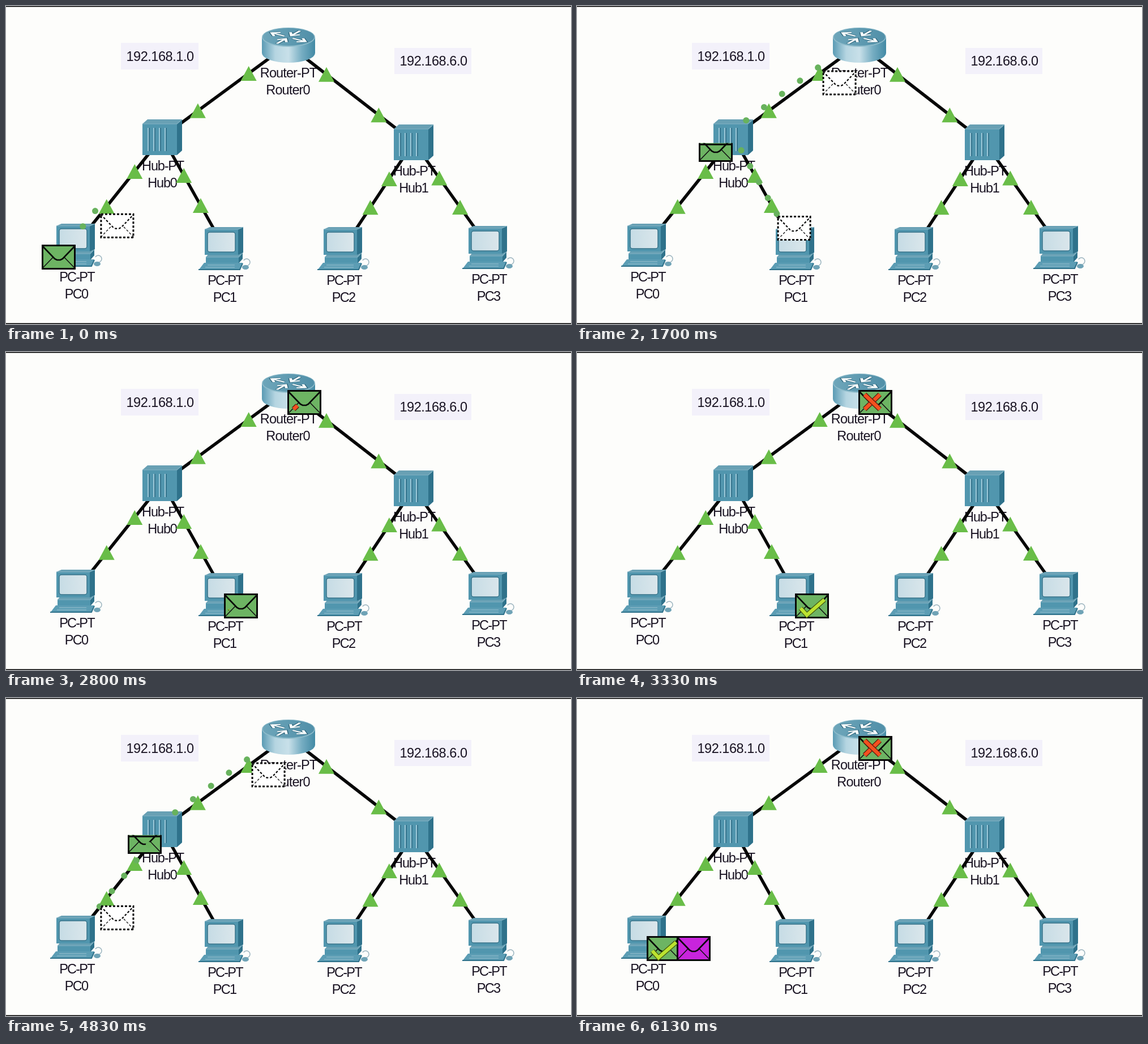
An HTML page with a canvas for the animation above (6.16 s loop, 998 by 561 pixels).

```html
<!DOCTYPE html>
<html lang="en">
<head>
<meta charset="utf-8">
<title>Network packet simulation</title>
<style>
html, body { margin: 0; width: 100%; height: 100%; overflow: hidden; background: #fdfdfb; }
canvas { display: block; }
</style>
</head>
<body>
<canvas id="stage" width="998" height="561"></canvas>
<script>
const ctx = document.getElementById('stage').getContext('2d');
const LOOP = 6160, STEPS = 7, STEP_MS = 101, MARK_MS = 520;

const router = [498, 68], hubs = [[276, 231], [720, 240]];
const pcs = [[124, 421], [386, 427], [596, 427], [852, 425]];
const links = [...hubs.map(h => [h, router]), ...pcs.map((p, i) => [hubs[i >> 1], p])];

// Each hop: start time, sender, receivers, and when the verdict is drawn.
const hops = [
  { start: -205, from: pcs[0], to: [hubs[0]] },
  { start: 1195, from: hubs[0], to: [router, pcs[1]], mark: 2770 },
  { start: 3350, from: pcs[1], to: [hubs[0]] },
  { start: 4300, from: hubs[0], to: [router, pcs[0]], mark: 5007, reply: true }
];

const clamp = v => Math.max(0, Math.min(1, v));
const mix = ([x0, y0], [x1, y1], f) => [x0 + (x1 - x0) * f, y0 + (y1 - y0) * f];
const gap = ([x0, y0], [x1, y1]) => Math.hypot(x1 - x0, y1 - y0);

function rect(x, y, w, h, color) {
  ctx.fillStyle = color;
  ctx.fillRect(x, y, w, h);
}

function trace(points) {
  ctx.beginPath();
  points.forEach(p => ctx.lineTo(...p));
}

function poly(points, color) {
  trace(points);
  ctx.fillStyle = color;
  ctx.fill();
}

function line(points, color, width) {
  trace(points);
  ctx.strokeStyle = color;
  ctx.lineWidth = width;
  ctx.stroke();
}

function outlined(points, width, dark, light) {
  line(points, dark, width + 2.5);
  line(points, light, width);
}

function ellipse(x, y, rx, ry, color) {
  ctx.beginPath();
  ctx.ellipse(x, y, rx, ry, 0, 0, 7);
  ctx.fillStyle = color;
  ctx.fill();
}

function shade(x0, x1, ...colors) {
  const g = ctx.createLinearGradient(x0, 0, x1, 0);
  colors.forEach((c, i) => g.addColorStop(i / (colors.length - 1), c));
  return g;
}

function at([x, y], draw) {
  ctx.save();
  ctx.translate(x, y);
  draw();
  ctx.restore();
}

// A block seen from the front left: front face, lid and right side.
function block(x, y, w, h, dx, dy) {
  const r = x + w, b = y + h;
  poly([[x, y], [x + dx, y - dy], [r + dx, y - dy], [r, y]], '#68a0b4');
  poly([[r, y], [r + dx, y - dy], [r + dx, b - dy], [r, b]], '#2f728b');
  rect(x, y, w, h, '#5196ae');
  line([[x, y], [r, y], [r + dx, y - dy]], '#83b4c5', 1.2);
}

function label(text, x, y, spacing) {
  ctx.font = '23.5px "Liberation Sans", Arial, sans-serif';
  ctx.letterSpacing = spacing + 'px';
  ctx.textAlign = 'center';
  ctx.fillStyle = '#191322';
  ctx.fillText(text, x, y);
}

function labels([x, y], kind, index, drop, spacing) {
  label(kind + '-PT', x + 1, y + drop, spacing);
  label(kind + index, x, y + drop + 29.5, spacing);
}

function drawRouter() {
  const side = shade(-46, 48, '#5a9bb4', '#b5d5e1', '#c8e0e9', '#76adc2', '#438aa5');
  ellipse(1, 15, 47, 17, side);
  rect(-46, -13, 94, 28, side);
  ellipse(1, -13, 47, 17, '#8fbccb');
  ellipse(1, -13.5, 45.5, 15.5, shade(-46, 48, '#6ea6ba', '#508fa8'));
  ctx.translate(1, -13);
  ctx.scale(1, .38);
  for (let i = 0; i < 4; i++) {
    ctx.rotate(Math.PI / 2);
    const tip = i % 2 ? 36 : 9, back = i % 2 ? 24 : 21;
    at([0, 0], () => {
      ctx.rotate(.6);
      for (const [color, width] of [['#2d6379', 8], ['#f6fbfc', 5]]) {
        line([[45 - tip, 0], [tip, 0]], color, width);
        line([[back, -10], [tip, 0], [back, 10]], color, width);
      }
    });
  }
}

function drawHub() {
  block(-35, -23, 61, 55, 9, 8);
  for (let x = -26; x < 10; x += 10) {
    rect(x, -16, 2, 41, '#9cc8d8');
    rect(x + 2, -16, 2, 41, '#37758e');
  }
}

function drawPc() {
  block(-33, 16, 58, 11, 7, 8);
  poly([[-36, 26], [32, 26], [27, 39], [-46, 39]], '#5c9db4');
  line([[-46, 38], [27, 38], [32, 27]], '#2f728b', 2);
  for (const y of [30, 34]) line([[-y, y], [18, y]], '#86b6c7', 1.5);
  block(-35, -33, 59, 45, 9, 4);
  ctx.beginPath();
  ctx.roundRect(-30, -28, 49, 35, 4);
  ctx.fillStyle = shade(-30, 19, '#c6dce5', '#dae6eb');
  ctx.fill();
  ctx.strokeStyle = '#377389';
  ctx.lineWidth = 1.5;
  ctx.stroke();
  ctx.beginPath();
  ctx.arc(39, 25, 6, -2.6, 2);
  ctx.strokeStyle = '#9ab3be';
  ctx.stroke();
  ellipse(37, 34, 6, 4, '#6fa3b6');
}

// Link lights sit at fixed distances from each end.
function drawLights([hub, end]) {
  const len = gap(hub, end);
  for (const d of [78, len - 86]) {
    const [x, y] = mix(hub, end, d / len);
    poly([[x, y - 13], [x + 14, y + 13], [x - 14, y + 13]], '#69bd48');
  }
}

function drawNetwork() {
  rect(0, 0, 998, 561, '#fdfdfb');
  rect(203, 65, 137, 47, '#f3f1fa');
  rect(686, 74, 136, 46, '#f3f1fa');
  label('192.168.1.0', 272, 97, -.45);
  label('192.168.6.0', 755, 105, -.45);
  labels(router, 'Router', 0, 58, -.9);
  hubs.forEach((p, i) => labels(p, 'Hub', i, 59, -1.2));
  pcs.forEach((p, i) => labels(p, 'PC', i, 65, -1.8));
  links.forEach(l => line(l, '#050505', 5.5));
  at(router, drawRouter);
  hubs.forEach(p => at(p, drawHub));
  pcs.forEach(p => at(p, drawPc));
  links.forEach(drawLights);
  for (const y of [0, 559.5]) rect(0, y, 998, 1.5, '#000');
}

function envelopeLines(width) {
  for (const x of [0, 58]) line([[x, 41], mix([x, 41], [29, 11], .66)], '#111', width * .6);
  line([[0, 1], [22, 24], [26, 26], [32, 26], [36, 24], [58, 1]], '#080808', width);
  ctx.lineWidth = 3;
  ctx.strokeRect(.5, .5, 57, 41);
}

function envelope(x, y, color = '#6db463', cut = 0) {
  at([x, y], () => {
    ctx.beginPath();
    ctx.rect(-2, cut - 2, 64, 60);
    ctx.clip();
    rect(0, 0, 58, 41, color);
    envelopeLines(2.7);
    rect(0, cut - 1, 58, 3, '#080808');
  });
}

function ghost(x, y) {
  at([x, y], () => {
    rect(0, 0, 58, 42, '#fff');
    ctx.setLineDash([4, 3]);
    envelopeLines(2.2);
  });
}

function cross(p) {
  const low = [10, 33], high = [37, 7];
  const bar = (a, b, part) => outlined([a, mix(a, b, part)], 6.5, '#5d2010', '#f4511f');
  bar(low, high, Math.max(.25, clamp(p * 2)));
  if (p > .5) bar([10, 7], [37, 33], clamp(p * 2 - 1));
}

function check(p) {
  ctx.beginPath();
  ctx.rect(5, 0, p * 56, 50);
  ctx.clip();
  outlined([[9, 25], [20, 37], [51, 10]], 6, '#45590f', '#bce330');
}

function trail(a, b, step) {
  const len = gap(a, b);
  const ox = -6 + 5 * (b[1] - a[1]) / len, oy = -2 - 5 * (b[0] - a[0]) / len;
  for (let k = 1; k <= step; k++) {
    const [x, y] = mix(a, b, k / STEPS);
    ellipse(x + ox, y + oy, 5.5, 5.5, '#68b25d');
  }
  ghost(...mix(a, b, step / STEPS));
}

function drawHop(hop, t) {
  const step = Math.floor((t - hop.start) / STEP_MS);
  if (step < STEPS) {
    const [x, y] = hop.from;
    envelope(x - 60, y + 1, undefined, 41 * clamp((step / STEPS - .6) / .4));
    hop.to.forEach(p => trail(hop.from, p, step));
    return;
  }
  const done = hop.mark ? clamp((t - hop.mark) / MARK_MS) : 0;
  for (const p of hop.to) {
    envelope(...p);
    if (hop.reply && p !== router) envelope(p[0] + 53, p[1], '#c824dc');
    if (done) at(p, () => (p === router ? cross : check)(done));
  }
}

function frame(now) {
  const t = now % LOOP;
  drawNetwork();
  drawHop(hops.findLast(h => h.start <= t), t);
  requestAnimationFrame(frame);
}
requestAnimationFrame(frame);
</script>
</body>
</html>
```
